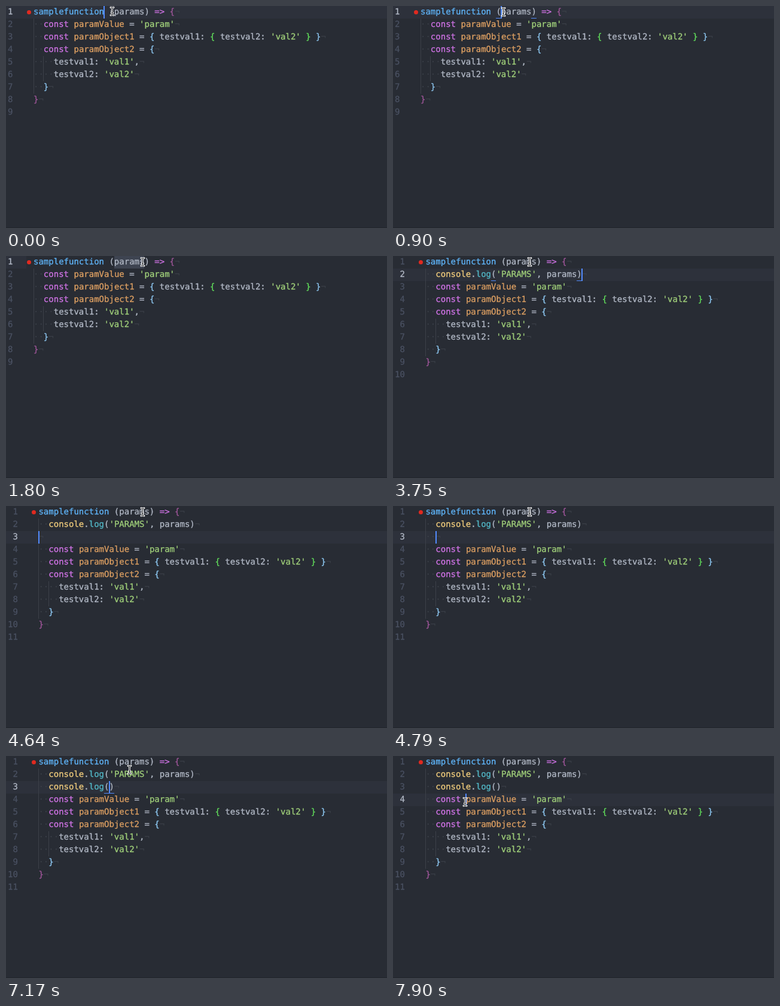
Recreate the animation shown at these times as an HTML page. Size 637x372 px, loop 8000 ms.

```html
<!DOCTYPE html>
<html lang="en">
<head>
<meta charset="utf-8">
<title>Code editor</title>
<style>
  html, body { margin: 0; width: 100%; height: 100%; overflow: hidden; background: #282c34; }
  #stage {
    position: relative; width: 637px; height: 372px; overflow: hidden;
    background: #282c34; color: #b2b9c6;
    font: 14px/21px "DejaVu Sans Mono", "Liberation Mono", monospace;
    font-variant-ligatures: none; text-rendering: geometricPrecision;
    -webkit-text-stroke: 0.3px currentColor;
  }
  #stage div, #stage svg { position: absolute; left: 0; top: 0; }
  #stage .edge { top: 371px; width: 637px; height: 1px; background: #21252b; }
  .active { height: 21px; background: #2d313b; }
  .line { white-space: pre; }
  #stage .num { left: 3px; text-align: right; color: #4a5162; }
  #stage .num.on { color: #b2b9c6; }
  .guide { width: 1px; height: 21px; background: #3c4049; }
  .sel { height: 21px; background: #3e4451; }
  .match { height: 1px; background: #528bff; }
  .caret { width: 2px; height: 21px; background: #528bff; }
  #stage .mark { width: 7px; height: 7px; top: 7px; border-radius: 50%; background: #e02a20; }
  .string { color: #a0d07a; }
  .key { color: #d073e6; }
  .func { color: #5fb4f8; }
  .var { color: #dc9f62; }
  .object { color: #efcb7c; }
  .method { color: #52b9c8; }
  .ghost { color: #3c4049; -webkit-text-stroke: 0; }
  .b0 { color: #a2579c; }
  .b1 { color: #8fcaf4; }
  .b2 { color: #62e05c; }
</style>
</head>
<body>
<div id="stage">
  <div id="editor"></div>
  <div class="edge"></div>
  <svg id="mouse" width="11" height="18" viewBox="-5.5 -9 11 18" fill="none">
    <defs>
      <path id="beam" d="M-2.5-6.5Q0-6.5 0-4.5V4.5Q0 6.5-2.5 6.5M2.5-6.5Q0-6.5 0-4.5M0 4.5Q0 6.5 2.5 6.5M-1.2 2.5H1.2"/>
    </defs>
    <use href="#beam" stroke="#fff" stroke-width="2.8" stroke-linecap="round"/>
    <use href="#beam" stroke="#15171b"/>
  </svg>
</div>
<script>
const LOOP = 8000, ROW = 21, CHAR = 8.428;
const editor = document.getElementById('editor');
const mouse = document.getElementById('mouse');

const code = [
  'samplefunction (params) => {',
  "  const paramValue = 'param'",
  "  const paramObject1 = { testval1: { testval2: 'val2' } }",
  '  const paramObject2 = {',
  "    testval1: 'val1',",
  "    testval2: 'val2'",
  '  }',
  '}',
  ''
];
const withLines = (...added) => [code[0], ...added, ...code.slice(1)];
const logged = "  console.log('PARAMS', params)";

// Each step changes only the listed properties.
const steps = [
  { t: 0, lines: code, row: 0, col: 14, caret: true, mouse: [177, 9], match: [], sel: 0 },
  { t: 150, mouse: [177, 10] },
  { t: 450, mouse: [178, 10], caret: false },
  { t: 600, mouse: [181, 10] },
  { t: 750, mouse: [184, 10] },
  { t: 900, col: 16, caret: true, match: [15, 22] },
  { t: 1050, mouse: [190, 10], caret: false, match: [], sel: 1 },
  { t: 1200, mouse: [207, 10], sel: 3 },
  { t: 1350, mouse: [226, 10], sel: 5 },
  { t: 1500, mouse: [227, 10], sel: 6 },
  { t: 1800, mouse: [228, 10] },
  { t: 3750, lines: withLines(logged), row: 1, col: 31, caret: true, match: [13, 30], sel: 0 },
  { t: 4200, caret: false },
  { t: 4640, lines: withLines(logged, ''), row: 2, col: 0, caret: true, match: [] },
  { t: 4790, lines: withLines(logged, '  '), col: 2 },
  { t: 5380, caret: false },
  { t: 5680, caret: true },
  { t: 6130, lines: withLines(logged, '  console.log()'), col: 14, match: [13, 14] },
  { t: 6570, caret: false },
  { t: 6870, caret: true },
  ...[0.06, 0.2, 0.45, 0.7, 0.9, 1].map((p, i) => ({
    t: 7020 + i * 147, mouse: [228 - 108 * p, 10 + 67 * p].map(Math.round)
  })),
  { t: 7900, row: 3, col: 8, match: [] }
];
const states = [];
steps.forEach((step, i) => states.push({ ...states[i - 1], ...step }));

const kinds = ['string', 'key', 'func', 'var', 'object', 'method'];
const token = /('[^']*')|(\bconst\b|=>)|(samplefunction)|(\bparam(?:Value|Object\d))|(console)|(\blog\b)|[{}]/g;
const span = (kind, text) => `<span class="${kind}">${text.replace('>', '&gt;')}</span>`;
const box = (kind, style, text = '') => `<div class="${kind}" style="${style}">${text}</div>`;
const indentOf = line => line.match(/^ */)[0].length;

function highlight(lines) {
  let depth = 0;
  return lines.map((line, i) => {
    const indent = indentOf(line);
    const body = line.slice(indent).replace(token, (text, ...groups) => {
      if (text === '{') return span('b' + depth++, text);
      if (text === '}') return span('b' + --depth, text);
      return span(kinds[groups.findIndex(Boolean)], text);
    });
    const end = i < lines.length - 1 ? '¬' : '';
    return span('ghost', '·'.repeat(indent)) + body + span('ghost', end);
  });
}

function draw(s) {
  const digits = String(s.lines.length).length;
  const left = 46 + (digits - 1) * CHAR;
  const x = col => left + col * CHAR;
  const y = row => row * ROW;
  let html = box('active', `top:${y(s.row)}px;width:${s.sel ? Math.floor(left) - 12 : 637}px`);

  if (s.sel) html += box('sel', `left:${x(s.col)}px;top:${y(s.row)}px;width:${s.sel * CHAR}px`);
  highlight(s.lines).forEach((text, row) => {
    for (let col = 0; col < indentOf(s.lines[row]); col += 2)
      html += box('guide', `left:${Math.floor(x(col))}px;top:${y(row)}px`);
    html += box(row === s.row ? 'num on' : 'num', `top:${y(row)}px;width:${digits * CHAR}px`, row + 1);
    html += box('line', `left:${left}px;top:${y(row)}px`, text);
  });
  html += box('mark', `left:${left - 11}px`);
  for (const col of s.match)
    html += box('match', `left:${x(col)}px;top:${y(s.row) + 20}px;width:${CHAR}px`);
  if (s.caret) html += box('caret', `left:${Math.floor(x(s.col))}px;top:${y(s.row)}px`);

  editor.innerHTML = html;
  mouse.style.left = s.mouse[0] - 5 + 'px';
  mouse.style.top = s.mouse[1] - 9 + 'px';
}

let shown;
const start = performance.now();
function tick() {
  const t = (performance.now() - start) % LOOP;
  const state = states.findLast(s => s.t <= t);
  if (state !== shown) draw(shown = state);
  requestAnimationFrame(tick);
}
tick();
</script>
</body>
</html>
```
